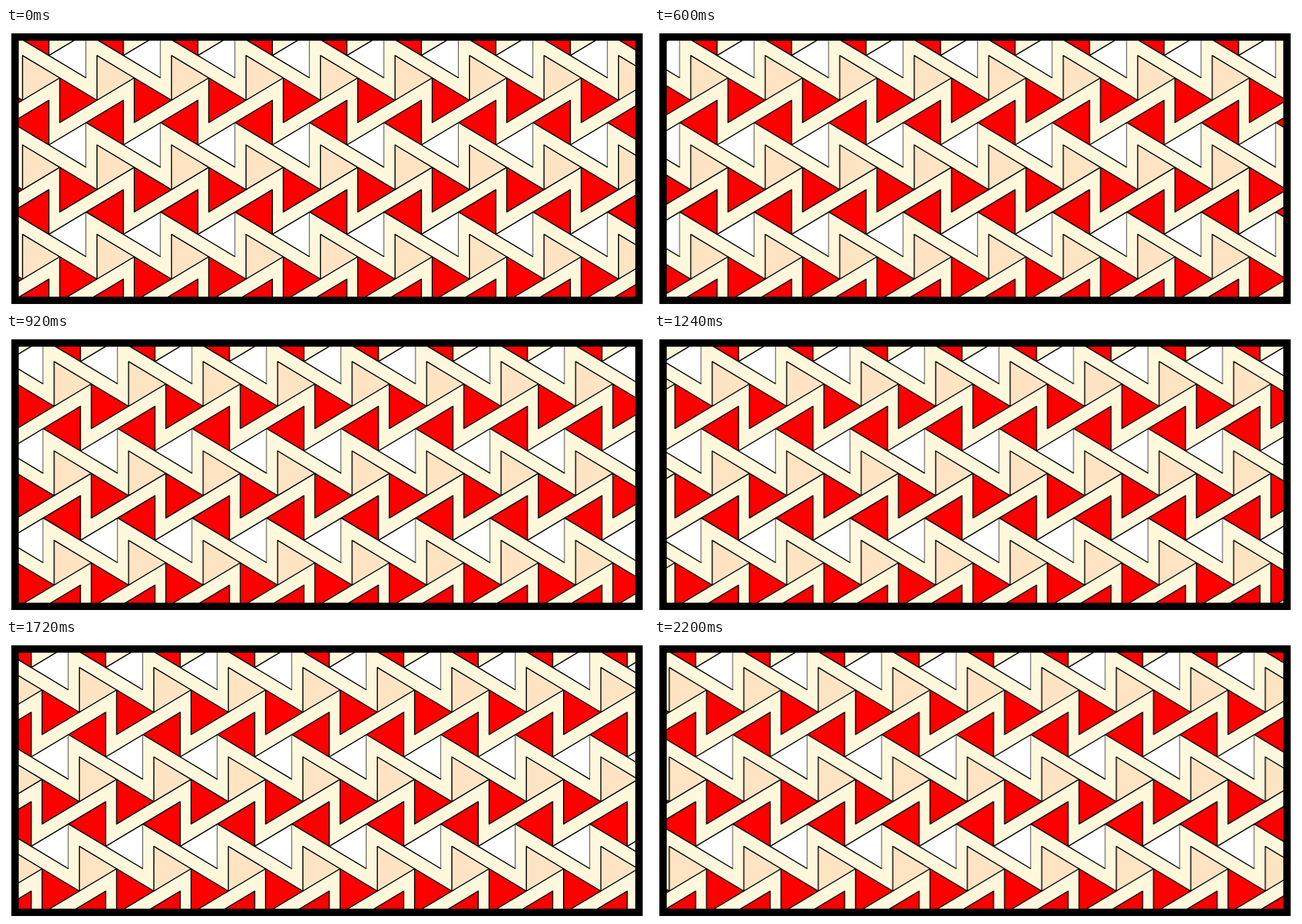
An HTML page for the animation above (2.24 s loop, 960 px wide and 417 px high).

```html
<!DOCTYPE html>
<html lang="en">
<head>
<meta charset="utf-8">
<title>Sliding triangle bands</title>
<style>
  html, body { margin: 0; width: 100%; height: 100%; overflow: hidden; background: #fff; }
  svg { display: block; width: 960px; height: 417px; }
  path { stroke: #000; stroke-width: 1.6; stroke-linejoin: round; }

  /* 56 even steps plus 3 extra hops add up to one tile width (59 units) */
  svg { --unit: 1.8881px; }
  #slide { animation: slide 2240ms steps(56) infinite; }
  #hop { animation: hop 2240ms step-end infinite; }
  @keyframes slide {
    from { transform: translateX(0); }
    to { transform: translateX(calc(56 * var(--unit))); }
  }
  @keyframes hop {
    0% { transform: translateX(0); }
    7.1428% { transform: translateX(var(--unit)); }
    33.9285% { transform: translateX(calc(2 * var(--unit))); }
    92.857%, 100% { transform: translateX(calc(3 * var(--unit))); }
  }
</style>
</head>
<body>
<svg viewBox="0 0 960 417">
  <clipPath id="window"><rect x="19" y="19" width="922" height="384"/></clipPath>
  <rect x="8" y="8" width="944" height="406"/>
  <g clip-path="url(#window)">
    <rect x="19" y="19" width="922" height="384" fill="#fff8dc"/>
    <g id="slide">
      <g id="hop">
        <path id="white" fill="#fff" style="stroke: none"/>
        <path id="whiteSides" fill="none"/>
        <path id="whiteEdge" fill="none" style="stroke-width: .8"/>
        <path id="peach" fill="#ffe4c4"/>
        <path id="red" fill="#f00"/>
      </g>
    </g>
  </g>
</svg>
<script>
  const tileW = 111.4, tileH = 134.12;
  const w = tileW / 2, h = tileH / 4;
  const left = 24.7, top0 = 41.3, redEdge = 64.1;

  const d = { white: '', whiteSides: '', whiteEdge: '', peach: '', red: '' };

  // Triangle with an upright side at x and its tip dx away
  const tri = (x, y, dx) => `M${x} ${y}l${dx} ${h}l${-dx} ${h}z`;

  for (let row = -1; row < 3; row++) {
    for (let col = -2; col < 10; col++) {
      const x = col * tileW, y = top0 + row * tileH;
      const edge = x + redEdge;
      d.peach += tri(x + left, y, w);
      d.red += tri(x + left + w, y + h, w) + tri(edge, y + 2 * h, -w);
      d.white += tri(edge + w, y + 3 * h, -w);
      d.whiteSides += `M${edge + w} ${y + 3 * h}l${-w} ${h}l${w} ${h}`;
      d.whiteEdge += `M${edge + w - 0.4} ${y + 3 * h}v${2 * h}`;
    }
  }
  for (const id in d) document.getElementById(id).setAttribute('d', d[id]);
</script>
</body>
</html>
```
